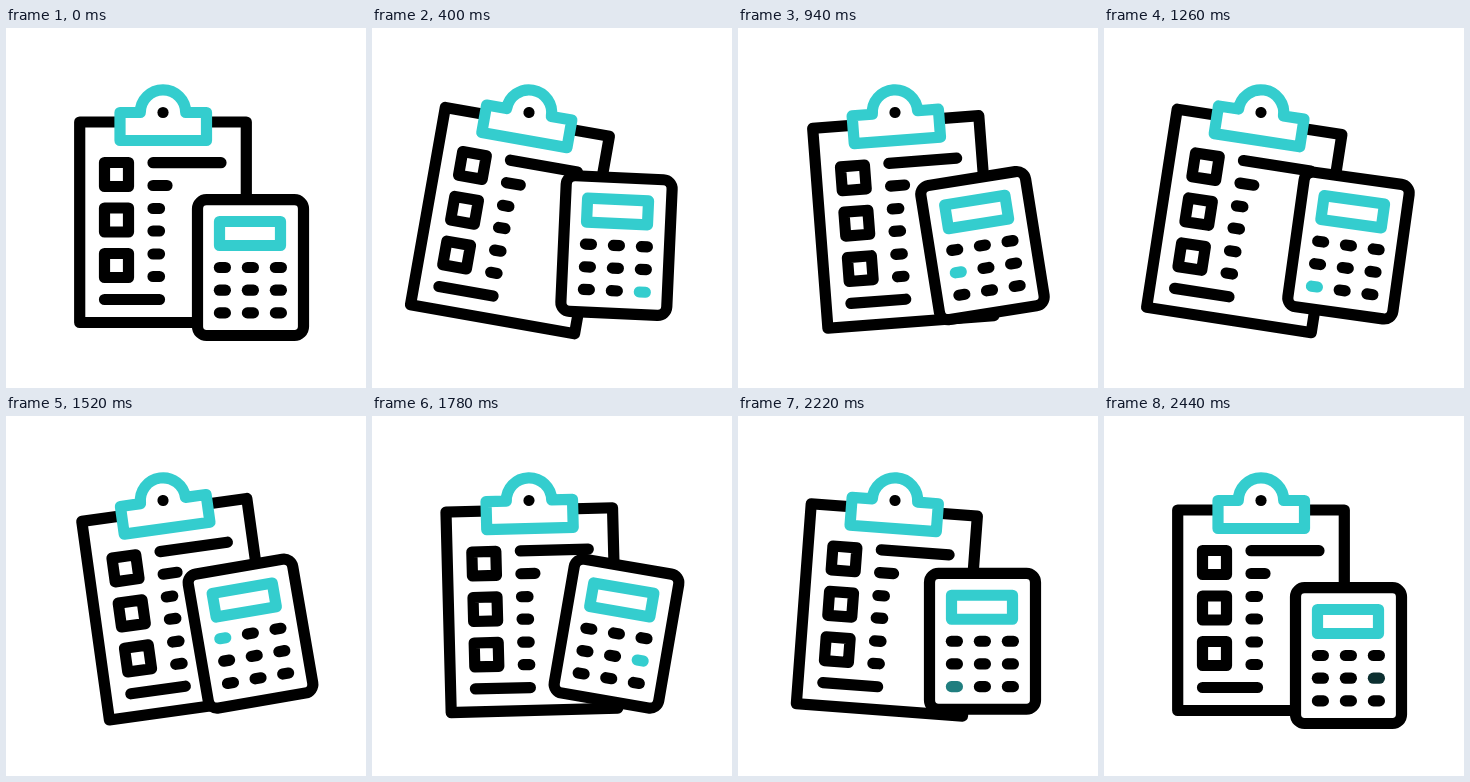
An HTML page for the animation above (2620 ms loop, 360 px wide and 360 px high).

```html
<!DOCTYPE html>
<html lang="en">
<head>
<meta charset="utf-8">
<title>Checklist and calculator</title>
<style>
  html, body { margin: 0; width: 100%; height: 100%; overflow: hidden; background: #fff; }
  svg { display: block; width: 100vw; height: 100vh; }
</style>
</head>
<body>
<svg viewBox="0 0 360 360" fill="none" stroke="#000" stroke-width="11.2" stroke-linecap="round" stroke-linejoin="round">
  <g id="board">
    <path d="M73.7 94H240.3V294.5H73.7Z" fill="#fff"/>
    <path d="M98.5 134.5h24v24h-24zM98.5 180h24v24h-24zM98.5 225.5h24v24h-24z"/>
    <path d="M147 134.7H215M147 157.5H161M147 180.5H153.5M147 203H153.5M147 226H153.5M147 248.5H153.5M98.5 271.5H153.5"/>
    <path d="M114 84.5H134.3A22.7 22.7 0 0 1 179.7 84.5H200.5V112.5H114Z" fill="#fff" stroke="#34cdce"/>
    <circle cx="157" cy="84.5" r="5.6" fill="#000" stroke="none"/>
  </g>
  <g id="calc">
    <rect x="191.5" y="171.7" width="106" height="135.8" rx="9" fill="#fff"/>
    <path d="M213.5 193.5h61v24h-61z" stroke="#34cdce"/>
    <g id="keys"></g>
  </g>
</svg>
<script>
const LOOP = 2620, END = 2440, STEP = 20;
const TEAL = [52, 205, 206];
const $ = id => document.getElementById(id);
const board = $('board'), calc = $('calc');

// Pairs of time and value, eased in and out between them.
const boardTurn = [[0, 0], [400, 10], [800, -10], [1200, 10], [1600, -10], [2000, 10], [2400, 0]];
const calcTurn = [[300, 0], [600, 10], [900, -10], [1200, 10], [1500, -10], [1800, 10], [2100, 0]];
const calcLift = [[0, 0], [300, -22], [2100, -22], [2400, 0]];

// Keys in the order they light up, at an even pace.
const presses = [...'51892638425739156813726'].map(Number);
const FIRST = 78, PACE = 105;

const keys = Array.from({ length: 9 }, (_, i) => {
  const key = document.createElementNS('http://www.w3.org/2000/svg', 'path');
  const x = 213.4 + 28 * (i % 3), y = 239.5 + 22.7 * Math.floor(i / 3);
  key.setAttribute('d', `M${x} ${y}h6`);
  return $('keys').appendChild(key);
});

function valueAt(track, t) {
  if (t <= track[0][0]) return track[0][1];
  for (let i = 1; i < track.length; i++) {
    const [t0, a] = track[i - 1], [t1, b] = track[i];
    if (t <= t1) {
      const s = (t - t0) / (t1 - t0);
      return a + (b - a) * s * s * (3 - 2 * s);
    }
  }
  return track[track.length - 1][1];
}

function glow(n, t) {
  let level = 0;
  presses.forEach((key, i) => {
    if (key !== n) return;
    const away = Math.abs(t - FIRST - PACE * i);
    level = Math.max(level, Math.min(1, (58 - away) / 26));
  });
  return level;
}

function draw(time) {
  const t = Math.min(END, Math.floor((time % LOOP) / STEP) * STEP);
  board.setAttribute('transform', `rotate(${valueAt(boardTurn, t)} 157 84.5)`);
  calc.setAttribute('transform',
    `translate(0 ${valueAt(calcLift, t)}) rotate(${valueAt(calcTurn, t)} 244.5 239.6)`);
  keys.forEach((key, i) => {
    const level = glow(i + 1, t);
    key.setAttribute('stroke', `rgb(${TEAL.map(c => Math.round(c * level))})`);
  });
}

let start;
function tick(now) {
  start ??= now;
  draw(now - start);
  requestAnimationFrame(tick);
}
draw(0);
requestAnimationFrame(tick);
</script>
</body>
</html>
```
